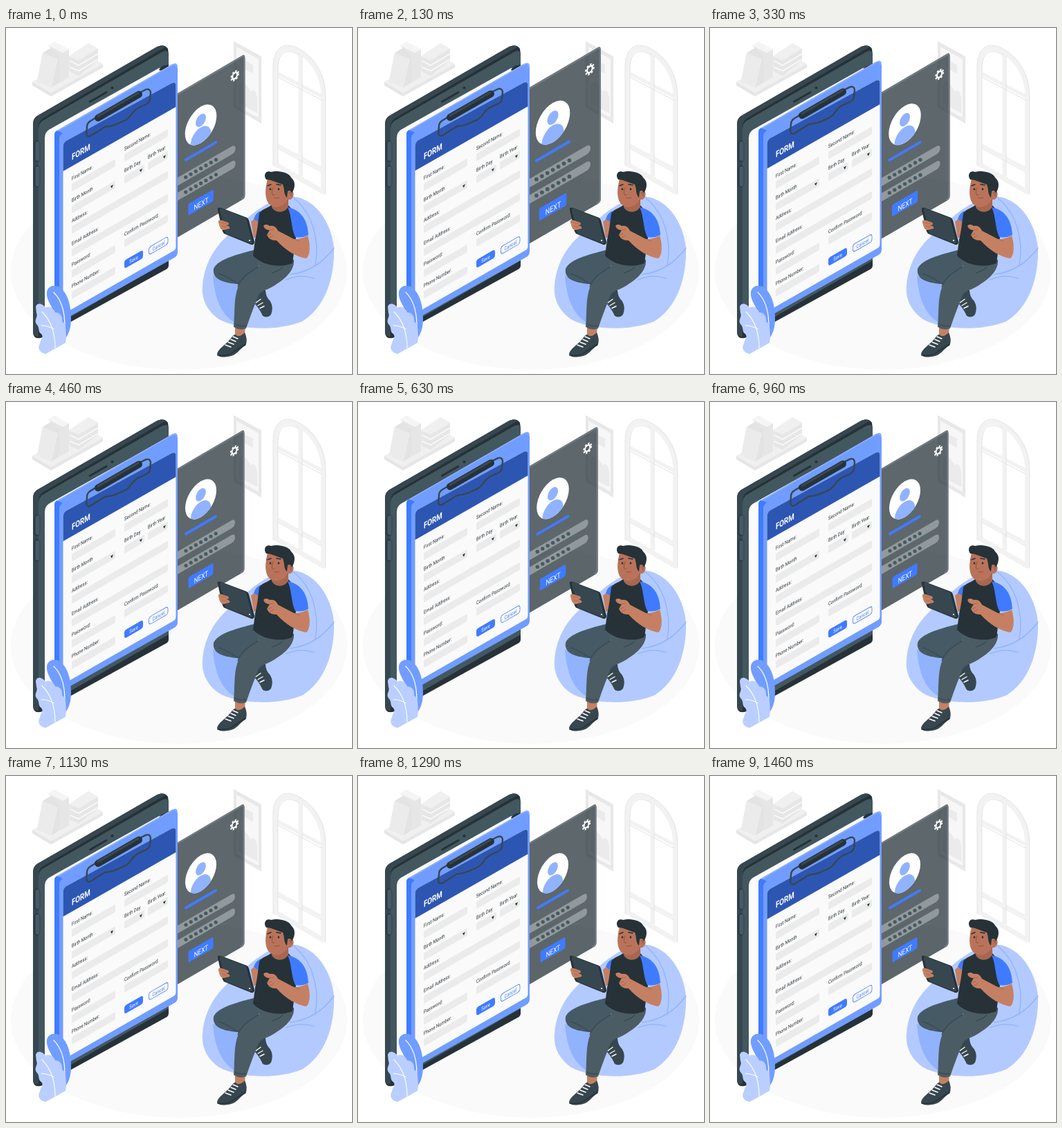
Recreate the animation shown at these times as an HTML page. Size 500 by 500 pixels, loop 1.5 s.

```html
<!DOCTYPE html>
<html lang="en">
<head>
<meta charset="utf-8">
<title>Form illustration</title>
<style>
html, body { margin: 0; width: 100%; height: 100%; overflow: hidden; background: #fff; }
svg { display: block; width: 100vw; height: 100vh; }
text { font-family: Roboto, "Open Sans", sans-serif; }
</style>
</head>
<body>
<svg id="stage" viewBox="0 0 500 500" stroke-linecap="round" stroke-linejoin="round"></svg>
<script>
const BLUE = '#407bff', DARK = '#263238', SLATE = '#37474f', GREY = '#455a64', SKIN = '#c58063';

const path = (d, fill, extra = '') => `<path d="${d}" fill="${fill}" ${extra}/>`;
const line = (d, color, width = 1) => path(d, 'none', `stroke="${color}" stroke-width="${width}"`);
// Places content on the isometric wall plane
const iso = (x, y, content) => `<g transform="matrix(.866 -.5 0 1 ${x} ${y})">${content}</g>`;
const bar = (x1, x2, y, h, attrs, r = 2) =>
  iso(x1, y, `<rect y="${-h / 2}" width="${(x2 - x1) / .866}" height="${h}" rx="${r}" ${attrs}/>`);
const label = (x, y, s, size = 7.5, attrs = `fill="${DARK}"`) =>
  `<text transform="matrix(.78 -.45 0 1 ${x} ${y})" font-size="${size}" ${attrs}>${s}</text>`;
const centered = fill => `fill="${fill}" text-anchor="middle"`;
const circle = (x, y, r, attrs) => `<circle cx="${x}" cy="${y}" r="${r}" ${attrs}/>`;

const room = `
  <ellipse cx="250" cy="352" rx="243" ry="142" fill="#fafafa"/>
  ${path('M38 78L113 37L140 52V57L65 99L38 83Z', '#e6e6e6')}
  ${path('M38 78L113 37L140 52L65 94Z', '#f0f0f0')}
  ${path('M53 36L68 27L84 37L77 79L66 86L45 77Z', '#e3e3e3')}
  ${path('M53 36L75 45L66 86L45 77Z', '#ebebeb')}
  ${path('M61 25L70 20L91 31V71L78 79L77 40Z', '#e6e6e6')}
  ${path('M61 25L70 20L91 31L82 36Z', '#f5f5f5')}
  ${path('M91 41L119 22L133 30V47L105 69L92 63Z', '#e6e6e6')}
  ${path('M91 41L119 22L133 30L105 47Z', '#f0f0f0')}
  ${line('M93 48L105 54L132 38M93 57L105 62L132 46', '#fafafa', 1.5)}
  ${path('M329 19L369 41V138L329 115Z', '#e8e8e8')}
  ${path('M333 27L365 45V130L333 112Z', '#f7f7f7')}
  ${path('M336 84C343 70 348 84 354 92C359 86 362 95 363 101V123L336 109ZM340 44L357 53V66L340 57Z', '#ebebeb')}
  ${line('M389.5 197V57C390 30 404 23 425 35C446 47 458.500 72 458.500 96V237Z', '#f2f2f2', 7)}
  ${line('M425 36V215M391 65L457 99M391 169L457 204', '#f2f2f2', 5)}
  ${line('M393 195V58C393 35 406 28 424 39M428 41V213M393 71L456 104M393 174L456 208', '#e3e3e3', 1)}
  ${line('M386 199V57C386 27 403 18 425 31C446 43 461.500 68 461.500 96V240', '#e3e3e3', 1)}`;

const dots = y => Array.from({ length: 7 }, (_, i) =>
  circle(260 + i * 7.2, y - i * 4.15, 2.6, `fill="${GREY}"`)).join('');

const login = `
  ${path('M217 114L340 42Q344.500 39 344.500 45V241Q344.500 245 341 247L217 319Z', DARK, 'opacity=".74"')}
  ${line('M217 115.500L340 43.500Q343.500 41 343.500 46V241Q343.500 244 340 246', '#727d83', 2)}
  ${iso(330, 70.5, circle(0, 0, 4.1, 'fill="none" stroke="#fff" stroke-width="2.400"') +
    circle(0, 0, 6, 'fill="none" stroke="#fff" stroke-width="2.400" stroke-linecap="butt" stroke-dasharray="2.500 2.212"'))}
  <clipPath id="disc"><circle r="26"/></clipPath>
  ${iso(281.5, 140.5, circle(0, 0, 26, 'fill="#fff"') +
    `<g clip-path="url(#disc)" fill="#91b2ff">${circle(0, -6.5, 8.5, '')}${circle(0, 20.5, 17, '')}</g>`)}
  ${line('M260 190.500L303 165.500', BLUE, 3.8)}
  ${bar(225, 331, 235, 11.5, 'fill="#92999d"', 5.7)}${dots(215)}
  ${bar(225, 331, 256.3, 11.5, 'fill="#92999d"', 5.7)}${dots(236.3)}
  ${bar(263.5, 299.5, 261.5, 16.5, `fill="${BLUE}"`)}
  ${label(282, 256.5, 'NEXT', 10.5, centered('#fff'))}`;

const tablet = `
  ${path('M39 139Q39 131 45 127L215 29Q228 21 234 30L235 38V343Q235 347 231 349L53 447Q39 452 39 438Z', DARK)}
  ${path('M39 139Q39 131 45 127L215 29Q224 23 231 27L54 130Q47 135 47 143V446Q39 446 39 438Z', '#37474f')}
  ${path('M47 146Q47 138 53 134L225 35Q235 30 235 40V336L56 439Q47 443 47 435Z', '#43575f')}
  ${path('M56 159Q56 151 62 147L221 58L235 55V324L56 427Z', '#fafafa')}
  ${path('M221 61Q222 55 235 53V64Z', DARK)}
  ${line('M121.500 106.500L145 93', DARK, 3)}${circle(153.5, 86.5, 2.1, `fill="${DARK}"`)}
  ${line('M45 167V189M45 203V226', DARK, 8.5)}
  ${line('M45.500 167V189M45.500 203V226', GREY, 6.5)}`;

const fields = [
  [95, 158, 220.5, 'First Name:'], [171, 234, 177.5, 'Second Name:'],
  [95, 158, 252, 'Birth Month', 1], [171, 200, 209, 'Birth Day', 1], [205, 234, 189.5, 'Birth Year', 1],
  [95, 234, 281.5, 'Address:'], [95, 234, 314.5, 'Email Address:'],
  [95, 158, 345, 'Password:'], [171, 234, 301, 'Confirm Password:'], [95, 158, 376, 'Phone Number:']
].map(([x1, x2, y, name, menu]) => bar(x1, x2, y + 10.5, 11, 'fill="#ebebeb"') + label(x1, y, name) +
  (menu ? iso(x2 - 5, y + 10.5 - (x2 - x1 - 5) * .577, path('M-2.300 -1.500H2.300L0 2.500Z', DARK)) : '')).join('');

const clipboard = `
  ${path('M70 154Q70 150 74 148L239 53Q248 48 248 57V324Q248 329 243 332L83 422Q70 428 70 417Z', '#709dff')}
  ${path('M70 154Q70 150 74 148L82 152Q77 155 77 160V424Q70 424 70 417Z', BLUE)}
  ${line('M75 148.500L239 54Q246 50 247 57', '#8cafff', 1.5)}
  ${path('M82.500 172Q82.500 166 87 163L239 80Q245.500 77 245.500 83V316Q245.500 320 242 322L87 411Q82.500 414 82.500 409Z', '#fafafa')}
  ${path('M82.500 207V172Q82.500 166 87 163L239 80Q245.500 77 245.500 83V114Z', '#2d56b3')}
  ${line('M134 127L121 135Q117 138 117 143L116 153Q117 158 122 156L138 146Q143 142 149 142Q156 141 162 138L173 133Q178 130 181 125Q184 120 190 116L203 110Q207 108 208 104L209 93Q208 87 202 89L192 94', SLATE, 2.4)}
  ${line('M133 130L192 96', DARK, 10)}${line('M133 127.500L191 94', '#3a4950', 3)}
  ${label(95, 191, 'FORM', 12.5, 'fill="#fff" font-weight="700"')}
  ${fields}
  ${bar(171, 198, 342, 12, `fill="${BLUE}"`, 3.5)}${label(184.5, 337, 'Save', 7.5, centered('#fff'))}
  ${bar(206.5, 234, 322.5, 11, `fill="none" stroke="${BLUE}" stroke-width=".9"`, 3.5)}${label(220.3, 317.5, 'Cancel', 7.5, centered(BLUE))}`;

const leaves = `
  ${path('M59 382C60 373 70 370 78 375C90 384 94 402 94 420C94 438 88 451 75 457C67 444 76 425 69 410C66 401 58 393 59 382Z', '#709dff')}
  ${line('M69 382C82 395 87 418 84 446', '#fff', 1.2)}
  ${path('M43 403C45 395 54 399 57 404C63 401 69 405 71 411C78 411 82 417 81 424C88 429 86 438 87 446L86 455L57 471C48 469 45 462 49 456C50 449 55 447 51 442C46 440 49 433 45 429C39 422 47 418 44 412Z', '#bacfff')}
  ${line('M52 410C64 422 71 440 71 462M51 430Q60 430 69 435', '#fff', 1.1)}`;

const beanbag = `
  ${path('M284 373C286 342 301 315 327 294C351 272 376 249 407 243C444 242 470 278 474 318C475 362 461 404 428 424C394 438 337 437 308 421C292 410 282 393 284 373Z', '#b2caff')}
  ${path('M299 358L340 370L333 427C314 417 302 397 299 358Z', '#91b2ff')}
  ${line('M416 246C441 266 454 304 447 342M474 318C456 342 435 353 411 356M446 362C430 357 420 358 404 364', '#91b2ff', 1.3)}`;

const man = `
  ${path('M360 378L375 379Q375 388 382 395Q387 404 383 414Q378 420 371 416Q365 403 357 396Z', SLATE)}
  ${line('M361 397L368 392M364 401L371 397M367 405L373 402', '#fff', 1.4)}
  ${path('M361 320C340 326 306 333 300 348C298 362 311 368 335 370L358 391L372 380L367 354Z', GREY)}
  ${path('M331 427H346L345 446L331 447Z', SKIN)}
  ${path('M305 472C306 463 317 459 326 447Q331 440 334 445Q340 446 345 440Q350 451 346 459C337 463 335 474 319 475Q309 477 305 472Z', SLATE)}
  ${line('M306 473Q319 475 329 468L346 457', DARK, 1.5)}
  ${line('M317 458L325 461M321 454L329 457M325 450L332 453M328 446L335 449', '#fff', 1.5)}
  ${path('M357 324L416 335Q417 349 402 362C390 372 375 380 367 381Q357 405 347 434Q338 438 329 432C331 407 329 389 336 373C341 362 355 354 366 345Z', '#4b5c64')}
  ${line('M365 345C349 354 340 361 335 374M336 370C325 363 317 358 308 355M400 346Q390 353 384 354M331 428Q338 432 347 430', SLATE, 1.1)}
  ${path('M367 268L354 280L358 303L364 302Z', SKIN)}
  ${path('M368 264Q361 267 358 276L366 281Z', BLUE)}
  ${path('M385 255C377 261 369 262 366 268C364 283 363 294 360 306L357 329C369 342 394 348 414 340L419 302L414 263L407 255Z', DARK)}
  ${path('M407 259C427 263 436 278 437 299Q428 304 418 302C412 290 413 271 407 259Z', BLUE)}
  ${path('M386 247L408 241V258C403 268 389 268 384 259Z', '#a96650')}
  ${path('M378 218C374 233 374 245 379 253C387 263 401 259 407 248C415 250 419 238 412 234L403 219Z', '#b9735a')}
  ${path('M376 219C371 212 376 205 383 208C394 205 409 209 412 216C419 222 418 231 413 239Q411 233 407 236L406 245C401 241 403 233 400 226C392 224 384 219 376 219Z', DARK)}
  ${line('M378 228L383 226M391 226L397 227', DARK, 1.5)}
  ${line('M386 231Q383 238 385 241L388 241M388 245.500Q391 247 395 245M409 238Q413 237 412 242', '#91513b', 1)}
  ${circle(382, 233, 1.4, `fill="${DARK}"`)}${circle(394, 233, 1.4, `fill="${DARK}"`)}
  ${path('M306 263Q305 258 311 260L348 274Q350 275 351 278L359 309Q359 314 354 313L317 298Q314 297 313 294Z', DARK)}
  ${path('M309 264Q308 260 312 261L347 275L356 309Q357 312 353 311L317 297Z', SLATE)}
  ${circle(352, 307, 1.1, 'fill="#fff"')}
  ${path('M307 281Q306 276 312 278L321 281Q324 285 318 285Q325 287 323 290L318 291Q312 294 309 288Z', SKIN)}
  ${line('M311 281L318 283M312 286L318 288', '#a9664c', .8)}
  ${path('M372 286Q375 282 381 286Q389 284 393 293L416 305Q425 306 436 300C440 313 440 328 434 333C421 331 404 322 391 307Q381 308 377 299L381 292Q374 292 372 286Z', SKIN)}
  ${line('M381 292L386 291M378 299L384 297M381 303L387 300M418 306L424 308', '#a9664c', .9)}`;

const stage = document.getElementById('stage');
stage.innerHTML = `${room}<g id="login">${login}</g>${tablet}<g id="clipboard">${clipboard}</g>${leaves}${beanbag}${man}`;
const loginEl = document.getElementById('login'), clipboardEl = document.getElementById('clipboard');

const LOOP = 1500;
const beats = [[0, 1], [.1, 1.1], [.3, 1], [.4, 1], [.5, 1.1], [.6, 1], [1, 1]];

function heartbeat(p) {
  const i = beats.findIndex(([at]) => at > p);
  const [p0, s0] = beats[i - 1], [p1, s1] = beats[i];
  return s0 + (s1 - s0) * (p - p0) / (p1 - p0);
}

function draw(now) {
  const p = (now + 20) % LOOP / LOOP;
  const lift = 4.1 * (Math.cos(2 * Math.PI * p) - 1);
  clipboardEl.setAttribute('transform', `translate(0 ${lift})`);
  loginEl.setAttribute('transform', `translate(281 178) scale(${heartbeat(p)}) translate(-281 -178)`);
}

const start = performance.now();
(function tick() {
  draw(performance.now() - start);
  requestAnimationFrame(tick);
})();
</script>
</body>
</html>
```
